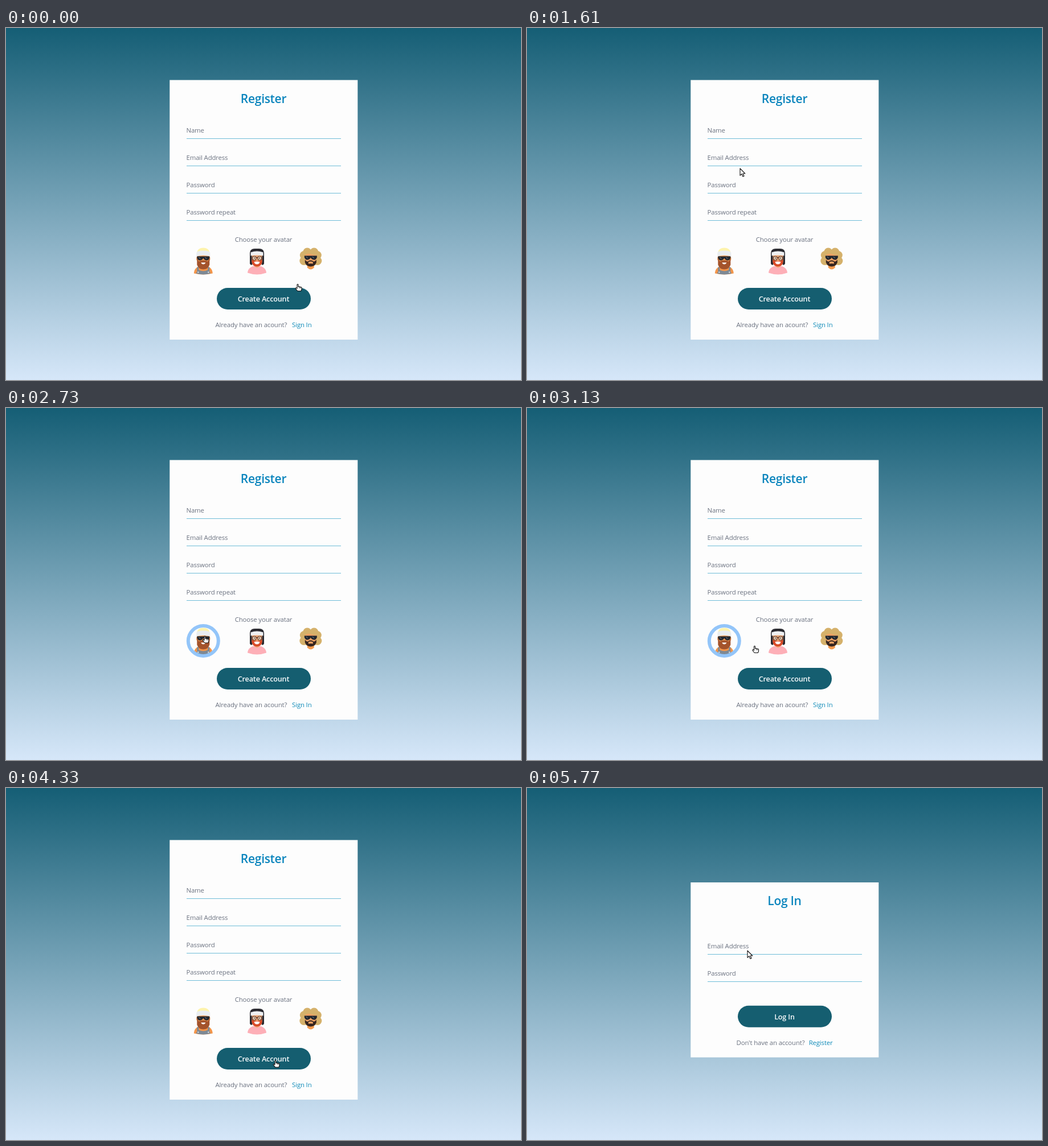
Recreate the animation shown at these times as an HTML page. Size 904 by 619 pixels, loop 5.85 s.

```html
<!DOCTYPE html>
<html lang="en">
<head>
<meta charset="utf-8">
<title>Register form</title>
<style>
  html, body { margin: 0; width: 100%; height: 100%; overflow: hidden; }
  body { background: linear-gradient(#155e75, #d6e7f9); }
  svg { display: block; width: 904px; height: 619px; }
  text { font: 11.4px "Open Sans", "Noto Sans", sans-serif; letter-spacing: -.15px; fill: #6b7280; }
  .title { font-size: 21px; font-weight: 600; letter-spacing: -.3px; fill: #0b85bd; }
  .label { font-size: 12.6px; font-weight: 600; fill: #f8fcfd; }
  .link { fill: #0e8ab8; }
  .mid { text-anchor: middle; }
  .end { text-anchor: end; }
  .card { fill: #fdfdfd; }
  .line { fill: #6fbdd8; }
  .button { fill: #155e70; }
  .ring { fill: none; stroke: #93c5f9; stroke-width: 6; visibility: hidden; }
  .cursor { fill: #fff; stroke: #111; stroke-width: 1.1; stroke-linejoin: round; stroke-linecap: round; }
</style>
</head>
<body>
<svg viewBox="0 0 904 619">
  <defs>
    <!-- each avatar is centred on x = 0, with the top of the hair at y = 0 -->
    <g id="avatar0">
      <path fill="#f3964b" d="M-16.5 45C-16 36-10 33-5 32H5C10 33 16 36 16.5 45Q8 47 0 47T-16.5 45Z"/>
      <path fill="#7d8995" d="M-11 34H-8V39Q0 43 8 39V34H11V42L13 45Q0 49-13 45L-11 42Z"/>
      <circle cx="-9" cy="43" r="1.2" fill="#d7dde2"/><circle cx="9" cy="43" r="1.2" fill="#d7dde2"/>
      <path fill="#fdf3ad" d="M-11 9C-11 -3 11 -3 11 9Z"/>
      <rect x="-12" y="15" width="24" height="8" rx="3" fill="#e98d47"/>
      <rect x="-10" y="12" width="20" height="17" fill="#f19a52"/>
      <path fill="#a4532b" d="M-11 18L-8 24Q0 20 8 24L11 18V30Q8 38 0 38T-11 30Z"/>
      <path fill="#e9edf0" d="M-12 15V9Q-11 5 0 5T12 9V15Q0 12-12 15Z"/>
      <path fill="#22262d" d="M-11 15H11V18Q9 23 5 22Q1 21 0 18Q-1 21-5 22Q-9 23-11 18Z"/>
      <path stroke="#7c8b98" d="M-8 17L-5 19M3 17L6 19"/>
      <path fill="#fff" d="M-4 26H4Q3 29 0 29T-4 26Z"/>
    </g>
    <g id="avatar1">
      <path fill="#fdafb7" d="M-16.5 44C-16 36-10 33-5 32H5C10 33 16 36 16.5 44Q8 47 0 47T-16.5 44Z"/>
      <path fill="#efaa78" d="M-4 27H4V33Q0 37-4 33Z"/>
      <path fill="#2b2b31" d="M-12.500 28V9Q-12 1.500-4 1.500H4Q12 1.500 12.500 9V28Q10 32 8 29V10H-8V29Q-10 32-12.500 28Z"/>
      <path fill="#efaa78" d="M-9 12H9V24Q7 33 0 33T-9 24Z"/>
      <path fill="#d94a27" d="M-9 20L-5 23H5L9 20V26Q7 33 0 33T-9 26Z"/>
      <path fill="#eef0f2" d="M-11 14V8Q0 4 11 8V14Q0 12-11 14Z"/>
      <g fill="#f7d6ba" stroke="#5a3629" stroke-width="1.200">
        <rect x="-8" y="15" width="6.500" height="6.500" rx="2.500"/><rect x="1.500" y="15" width="6.500" height="6.500" rx="2.500"/>
        <path d="M-1.500 17H1.500"/>
      </g>
      <circle cx="-4.500" cy="18" r="1" fill="#252525"/><circle cx="4.500" cy="18" r="1" fill="#252525"/>
      <path fill="#fff" d="M-5 25Q0 23 5 25Q4 29 0 29T-5 25Z"/>
    </g>
    <g id="avatar2">
      <g fill="#d5b16b">
        <circle cx="-6" cy="7.500" r="7.500"/><circle cx="6" cy="7.500" r="7.500"/>
        <circle cx="-11.500" cy="13" r="7.500"/><circle cx="11.500" cy="13" r="7.500"/>
        <circle cx="-12" cy="23" r="7.500"/><circle cx="12" cy="23" r="7.500"/>
        <rect x="-11" y="7" width="22" height="24" rx="5"/>
      </g>
      <path fill="#f49a4d" d="M-6 29H6V35Q0 41-6 35Z"/>
      <path fill="#f1a264" d="M-10 13Q-5 9 0 11T10 13V25Q8 33 0 33T-10 25Z"/>
      <path fill="#36251f" d="M-10 21Q-7 25-5 24Q0 20 5 24Q7 25 10 21V26Q7 33 0 33T-10 26Z"/>
      <path fill="#f1a264" d="M-4 25Q0 23 4 25V28H-4Z"/>
      <path fill="#36251f" d="M-2 28H2V32H-2Z"/>
      <path fill="#22262d" d="M-11 14H11V17Q9 22 5 21Q1 20 0 17Q-1 20-5 21Q-9 22-11 17Z"/>
      <path stroke="#7c8b98" d="M-8 16L-5 18M3 16L6 18"/>
    </g>
  </defs>

  <g id="register"></g>
  <g id="login"></g>

  <!-- the pointing spot of each cursor is at 0,0 -->
  <g id="pointer" class="cursor">
    <path id="arrow" d="M0 0V12.300L2.900 9.700L4.900 14.300L7 13.400L5 9H8.800Z"/>
    <g id="hand">
      <path d="M-1 .6Q0-.5 1 .6V4.500Q2.200 3.600 3 4.800Q4.200 4 5 5.200Q6.300 4.700 7 6V9L5.800 12H-.2L-3.500 8Q-3.900 6.200-2.500 6.400L-1 7.600Z"/>
      <path d="M3 5V7M5 5.500V7.300" stroke-width=".7"/>
    </g>
    <g id="beam" fill="none">
      <path stroke="#fff" stroke-width="3" d="M-2.500-5.500H2.500M0-5.500V5.500M-2.500 5.500H2.500"/>
      <path stroke-width="1.300" d="M-2.500-5.500H2.500M0-5.500V5.500M-2.500 5.500H2.500"/>
    </g>
  </g>
</svg>

<script>
const LOOP = 5850, STEP = 80, FIRST_MOVE = 1290, SWITCH = 5290;
const $ = id => document.getElementById(id);

const text = (x, y, words, cls = "") => `<text x="${x}" y="${y}" class="${cls}">${words}</text>`;
const rect = (x, y, w, h, cls, r = 0) =>
  `<rect x="${x}" y="${y}" width="${w}" height="${h}" rx="${r}" class="${cls}"/>`;
const field = (y, words) => text(316.5, y, words) + rect(317, y + 10, 271, 1, "line");

// Shared layout of both forms; bottom is the lower edge of the card.
function form(top, bottom, title, action, question, link) {
  return rect(287.3, top, 330, bottom - top, "card")
    + text(452, top + 40, title, "title mid")
    + rect(370, bottom - 91, 165, 38, "button", 19)
    + text(452, bottom - 67, action, "label mid")
    + text(367.5, bottom - 22, question)
    + text(536.5, bottom - 22, link, "link end");
}

const avatarX = [346.3, 440.5, 534.8];
$("register").innerHTML = form(91.5, 548, "Register", "Create Account", "Already have an acount?", "Sign In")
  + ["Name", "Email Address", "Password", "Password repeat"].map((s, i) => field(184 + 48 * i, s)).join("")
  + text(452, 375.5, "Choose your avatar", "mid")
  + avatarX.map((x, i) =>
      `<use href="#avatar${i}" x="${x}" y="386.500"/><circle class="ring" cx="${x}" cy="409.500" r="26.500"/>`).join("");
$("login").innerHTML = form(166, 473.7, "Log In", "Log In", "Don't have an account?", "Register")
  + field(282, "Email Address") + field(330, "Password");

// time, x, y
const path = [
  [0, 512, 450.5], [1210, 512, 450.5], [1290, 502, 437], [1610, 374, 247],
  [1850, 346, 181], [2010, 352, 186], [2250, 376.3, 244], [2490, 367, 329],
  [2730, 349, 401], [2970, 354, 414], [3130, 399.5, 418.5], [3290, 440, 413],
  [3530, 532, 411], [3770, 559, 486.5], [4090, 478, 480], [4410, 472, 479],
  [4650, 500, 503], [4890, 521.3, 526], [5050, 518, 523], [5450, 518, 523], [5770, 387, 286]
];
// Each entry holds from its time until the next one.
const shapes = [
  [0, "hand"], [1290, "arrow"], [1690, "beam"], [2570, "arrow"], [2650, "hand"],
  [3690, "arrow"], [3930, "hand"], [4490, "arrow"], [4970, "hand"], [5370, "arrow"]
];
const hovers = [[2650, 3210], [3210, 3450], [3450, 3690]];
const rings = document.querySelectorAll(".ring");

function place(t) {
  const i = Math.max(1, path.findIndex(p => p[0] >= t));
  const [a, b] = [path[i - 1], path[i]];
  const k = (t - a[0]) / (b[0] - a[0]);
  const ease = k * k * (3 - 2 * k);
  return [1, 2].map(n => a[n] + (b[n] - a[n]) * ease);
}

const show = (el, on) => { el.style.visibility = on ? "visible" : "hidden"; };

function draw(time) {
  const t = time < FIRST_MOVE ? 0 : FIRST_MOVE + Math.floor((time - FIRST_MOVE) / STEP) * STEP;
  $("register").style.display = t < SWITCH ? "" : "none";
  $("login").style.display = t < SWITCH ? "none" : "";
  hovers.forEach(([from, to], i) => show(rings[i], t >= from && t < to));
  const shape = shapes.filter(s => s[0] <= t).pop()[1];
  for (const id of ["arrow", "hand", "beam"]) show($(id), id === shape);
  $("pointer").setAttribute("transform", `translate(${place(t)})`);
}

const start = performance.now();
function tick() {
  draw((performance.now() - start) % LOOP);
  requestAnimationFrame(tick);
}
tick();
</script>
</body>
</html>
```
